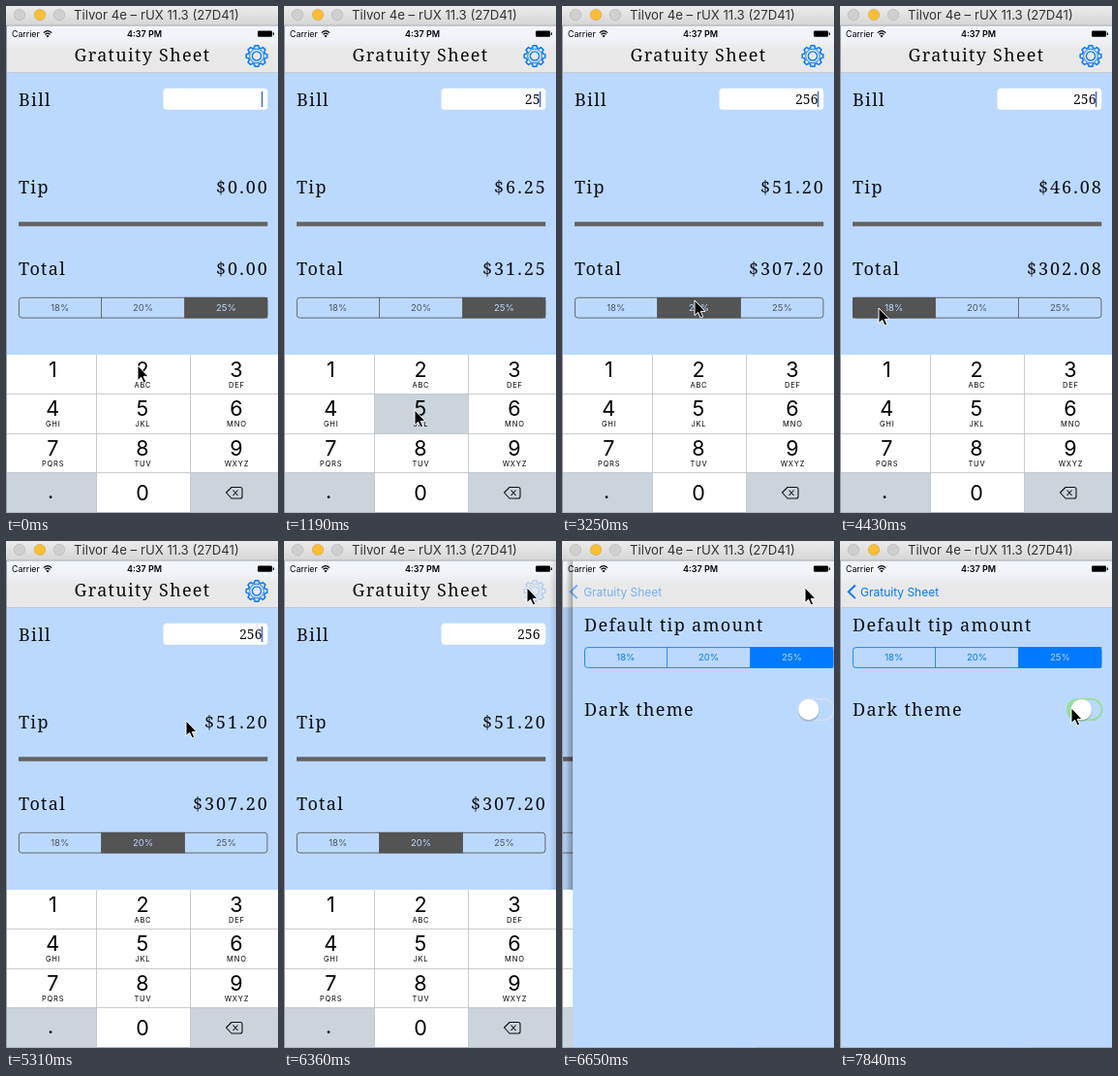
These frames come from a looping animation (281x522 px, 7990 ms). An HTML page:

```html
<!DOCTYPE html>
<html lang="en">
<head>
<meta charset="utf-8">
<title>Gratuity Sheet</title>
<style>
  html, body { margin: 0; width: 100%; height: 100%; overflow: hidden; background: #bbd9ff; }
  svg { display: block; width: 100vw; height: 100vh; }
  text { font-family: Inter, Roboto, sans-serif; white-space: pre; }
  .type { font-family: "Noto Serif", "Liberation Serif", serif; font-size: 18px; font-weight: 300; letter-spacing: 1.3px; fill: #0c0d10; }
  .sum { letter-spacing: 2px; text-anchor: end; }
  .mid { text-anchor: middle; }
  .seg { font-size: 9.5px; text-anchor: middle; }
  .digit { font-size: 21.5px; text-anchor: middle; }
  .letters { font-size: 7.5px; letter-spacing: .8px; text-anchor: middle; }
</style>
</head>
<body>
<svg id="stage" viewBox="0 0 281 522" preserveAspectRatio="none"></svg>
<script>
const LOOP = 7990, STEPS = 54, PUSH = 43;
const BLUE = '#007aff', SKY = '#bbd9ff', SLATE = '#545454', KEY_GRAY = '#cbd3db';
const APP = 'Gratuity Sheet';

// Pointer stops: step, x, y
const POINTER = [
  [0, 136, 370], [3, 136, 370], [6, 135, 416], [9, 135, 416], [11, 234, 416],
  [14, 234, 416], [18, 136, 303], [20, 137, 303], [23, 137, 303], [27, 40, 309],
  [30, 40, 311], [33, 129, 311], [35, 129, 311], [36, 186, 185], [37, 190, 178],
  [41, 251, 49], [43, 251, 48], [46, 251, 48], [50, 232, 149], [51, 229, 165],
  [52, 238, 172], [53, 239, 172]
];
const BILLS = [[0, ''], [2, '2'], [8, '25'], [12, '256']];
const PICKS = [[0, 2], [20, 1], [29, 0], [34, 1]];
const PRESSED = [[0, 0], [1, 2], [3, 0], [7, 5], [10, 0], [11, 6], [13, 0]];

const rect = (x, y, w, h, fill, more = '') =>
  `<rect x="${x}" y="${y}" width="${w}" height="${h}" fill="${fill}" ${more}/>`;
const text = (x, y, str, cls = '', more = '') =>
  `<text x="${x}" y="${y}" class="${cls}" ${more}>${str}</text>`;
const line = (x1, y1, x2, y2, color, width = 1) =>
  `<path d="M${x1} ${y1}L${x2} ${y2}" stroke="${color}" stroke-width="${width}" fill="none"/>`;

function segments(id, y, color, ink) {
  const edges = [13, 98.5, 184.5, 270.25];
  let out = '';
  for (let i = 0; i < 3; i++) {
    const x = edges[i], w = edges[i + 1] - x;
    out += rect(x, y, w, 21.5, color, `id="${id}${i}"`);
    out += text(x + w / 2, y + 14.2, ['18%', '20%', '25%'][i], 'seg', `id="${id}t${i}" data-ink="${ink}"`);
  }
  for (const x of edges.slice(1, 3)) out += line(x, y, x, y + 21.5, color, .8);
  return out + rect(13.4, y + .4, 256.5, 20.8, 'none', `rx="3" stroke="${color}" stroke-width=".85"`);
}

function keypad() {
  const xs = [1, 93.5, 190.5, 281], ys = [359.25, 399.5, 440.5, 480.5, 521.25];
  const letters = ['', 'ABC', 'DEF', 'GHI', 'JKL', 'MNO', 'PQRS', 'TUV', 'WXYZ'];
  const centers = [48.3, 141, 238];
  let out = rect(1, 359.25, 280, 162, '#fff');
  for (let i = 0; i < 9; i++) {
    const c = i % 3, r = i / 3 | 0;
    out += rect(xs[c], ys[r], xs[c + 1] - xs[c], ys[r + 1] - ys[r], '#fff', `id="key${i + 1}"`);
    out += text(centers[c], 381.7 + 40.5 * r, i + 1, 'digit');
    out += text(centers[c] + .4, 392.5 + 40.7 * r, letters[i], 'letters');
  }
  out += rect(1, 480.5, 92.5, 41, KEY_GRAY) + rect(190.5, 480.5, 91, 41, KEY_GRAY);
  for (const y of ys.slice(1, 4)) out += line(1, y, 281, y, '#bcc1c6', .8);
  for (const x of xs.slice(1, 3)) out += line(x, 359.25, x, 522, '#bcc1c6', .8);
  out += text(46, 507, '.', 'digit') + text(141, 508.7, '0', 'digit');
  return out + `<path d="M227.5 501L233 495.5H242Q244 495.5 244 497.5V505Q244 507 242 507H233ZM234.5 498.5L239.5 504M239.5 498.5L234.5 504"
    fill="none" stroke="#111" stroke-width="1.1" stroke-linejoin="round"/>`;
}

function gear() {
  const pts = [];
  for (let i = 0; i < 8; i++) {
    for (const [off, r] of [[-.27, 8.8], [-.17, 11], [.17, 11], [.27, 8.8]]) {
      const a = i * Math.PI / 4 + off;
      pts.push((r * Math.cos(a)).toFixed(2) + ' ' + (r * Math.sin(a)).toFixed(2));
    }
  }
  return `<g id="gear" transform="translate(259 51.5)" fill="none" stroke="${BLUE}" stroke-width="1.5" stroke-linejoin="round">
    <path d="M${pts.join('L')}Z"/><circle r="7.3" stroke-width="1"/><circle r="4.6" stroke-width="1.3"/></g>`;
}

const windowBar = () => rect(0, 0, 281, 20.5, 'url(#bar)') + line(0, 20, 281, 20, '#b5b5b5') +
  [['#cfcfcf', 14], ['#fdbe2f', 35], ['#cfcfcf', 55]].map(([c, x]) =>
    `<circle cx="${x}" cy="9" r="5.8" fill="${c}" stroke="#000" stroke-opacity=".13" stroke-width=".8"/>`).join('') +
  text(70, 14, 'Tilvor 4e – rUX 11.3 (27D41)', '', 'font-size="13.2" fill="#333"');

const statusBar = () => text(6, 32, 'Carrier', '', 'font-size="8.8"') +
  text(143, 32, '4:37 PM', 'mid', 'font-size="9" font-weight="600"') +
  `<path d="M38.8 27.6Q43 23.8 47.2 27.6M40.4 29.4Q43 27 45.6 29.4" fill="none" stroke="#000" stroke-width="1.2"/>
   <path d="M41.4 30.7Q43 29.4 44.6 30.7L43 32.4Z"/>` +
  rect(260, 25.5, 15, 6.2, '#000', 'rx="1.2"') + rect(275.7, 27.2, 1.2, 2.7, '#000', 'rx=".5"');

const mainView = () => rect(1, 20, 280, 502, SKY) +
  text(13, 102.5, 'Bill', 'type') + rect(162.5, 84.75, 107.75, 22, '#fff', 'rx="3.5"') +
  text(264.5, 101, '', 'type', 'id="bill" style="font-size:14px;letter-spacing:0;text-anchor:end"') +
  rect(263.8, 88, 1.5, 16, '#4467e6', 'id="caret"') +
  text(13, 192.5, 'Tip', 'type') + text(271.8, 192.5, '', 'type sum', 'id="tip"') +
  rect(13, 222.25, 257.25, 4.5, '#636363') +
  text(13, 277, 'Total', 'type') + text(271.8, 277, '', 'type sum', 'id="total"') +
  segments('rate', 299.9, SLATE, '#4c5665');

const settingsView = () => rect(1, 20, 281, 502, SKY) +
  text(13, 93, 'Default tip amount', 'type') + segments('preset', 109.2, BLUE, BLUE) +
  text(13, 180, 'Dark theme', 'type') +
  rect(233.8, 162, 37.6, 23, '', 'id="track" rx="11.5"') + rect(0, 0, 0, 0, SKY, 'id="hole"') +
  `<circle cy="175" r="11" fill="#000" opacity=".16" id="knobShade"/><circle cy="173.6" r="10.6" fill="#fff" id="knob"/>`;

const navBar = () => rect(1, 20.5, 280, 48, 'url(#nav)') + line(1, 68.5, 281, 68.5, '#c3cbd5') + statusBar() +
  text(141, 57, APP, 'type mid', 'id="title"') + gear() +
  `<g id="back"><path d="M15.8 45.5L8.8 52.3L15.8 59.1" fill="none" stroke="${BLUE}" stroke-width="2"/>` +
  text(21, 57, APP, '', `id="backLabel" font-size="12" fill="${BLUE}"`) + '</g>';

const gradient = (id, dir, stops) => `<linearGradient id="${id}" x1="0" y1="0" ${dir}>` +
  stops.map(([o, c, a = 1]) => `<stop offset="${o}" stop-color="${c}" stop-opacity="${a}"/>`).join('') + '</linearGradient>';

// The keypad slides out on its own, above the shadow
document.getElementById('stage').innerHTML = '<defs>' +
  gradient('bar', 'x2="0" y2="1"', [[0, '#ebebeb'], [1, '#d5d5d5']]) +
  gradient('nav', 'x2="0" y2="1"', [[0, '#f3f7fd'], [.3, '#eff2f7'], [.5, '#e9e9e9'], [1, '#e7e7e8']]) +
  gradient('edge', 'x2="1" y2="0"', [[0, '#000', 0], [1, '#000', .3]]) +
  '<clipPath id="screen"><rect x="1" y="20" width="280" height="501.25"/></clipPath></defs>' +
  rect(0, 520, 281, 2, '#9aa0a6') +
  `<g clip-path="url(#screen)"><g id="main">${mainView()}</g>` +
  rect(1, 20, 280, 502, '#000', 'id="dim"') + `<g id="settings">${settingsView()}</g>${navBar()}` +
  rect(-6, 20, 7, 502, 'url(#edge)', 'id="shadow"') + `<g id="keypad">${keypad()}</g></g>` +
  windowBar() + line(.5, 20, .5, 522, '#9aa0a6') +
  '<path id="pointer" d="M0 0V15.6L3.6 12.3L6.2 18L8.7 16.9L6.2 11.4H11Z" stroke="#fff" stroke-width="1" stroke-linejoin="round"/>';

const el = {};
document.querySelectorAll('[id]').forEach(e => el[e.id] = e);
const set = (id, attrs) => { for (const k in attrs) el[id].setAttribute(k, attrs[k]); };
const shift = (id, x) => set(id, { transform: `translate(${x.toFixed(2)} 0)` });
const clamp = v => Math.max(0, Math.min(1, v));
const at = (list, s) => list.filter(e => e[0] <= s).pop()[1];
const money = v => '$' + v.toFixed(2);

function select(id, pick) {
  for (let i = 0; i < 3; i++) {
    const label = id + 't' + i;
    set(id + i, { 'fill-opacity': i === pick ? 1 : 0 });
    set(label, { fill: i === pick ? SKY : el[label].dataset.ink });
  }
}

function pointerAt(s) {
  const i = POINTER.findIndex(p => p[0] >= s);
  const b = POINTER[i], a = POINTER[Math.max(0, i - 1)];
  const k = b[0] === a[0] ? 0 : (s - a[0]) / (b[0] - a[0]);
  const e = k * k * (3 - 2 * k);
  return [a[1] + (b[1] - a[1]) * e, a[2] + (b[2] - a[2]) * e];
}

function drawSwitch(on) {
  const knobX = on ? 249.4 : 244.8;
  set('track', { fill: on ? '#98dd9b' : '#d9e0e8' });
  // The rim thickens behind the knob as the switch turns on
  const x = on ? 239 : 235, pad = on ? 1.8 : 1.2;
  set('hole', { x, y: 162 + pad, width: 271.4 - pad - x, height: 23 - 2 * pad, rx: 11.5 - pad });
  set('knob', { cx: knobX });
  set('knobShade', { cx: knobX });
}

function draw(ms) {
  // The screen is refreshed in even steps
  const s = Math.min(STEPS - 1, Math.floor(ms / LOOP * STEPS + .12));

  const bill = at(BILLS, s), pick = at(PICKS, s), pressed = at(PRESSED, s);
  const tip = bill * [.18, .2, .25][pick];
  el.bill.textContent = bill;
  el.tip.textContent = money(tip);
  el.total.textContent = money(+bill + tip);
  select('rate', pick);
  select('preset', 2);
  for (let i = 1; i <= 9; i++) set('key' + i, { fill: i === pressed ? KEY_GRAY : '#fff' });
  set('caret', { opacity: s < PUSH && (s + 1) % 7 < 5 ? 1 : 0 });

  // Spring push to the settings screen
  const u = Math.max(0, s - PUSH) * 2.57;
  const left = s < PUSH ? 1 : (1 + u) * Math.exp(-u);
  const fade = clamp((s - PUSH) / 4);
  shift('main', -84 * (1 - left));
  shift('title', -84 * (1 - left));
  shift('keypad', -280 * (1 - left));
  shift('settings', 280 * left);
  shift('shadow', 280 * left);
  set('dim', { opacity: .08 * (1 - left) });
  set('settings', { opacity: s < PUSH ? 0 : 1 });
  set('shadow', { opacity: s < PUSH || s > 46 ? 0 : .4 + .6 * (1 - left) });
  set('title', { opacity: clamp(1 - (s - PUSH) / 1.5) });
  set('gear', { opacity: s < PUSH ? 1 : clamp(.22 - (s - PUSH) * .12) });
  set('back', { opacity: fade });
  set('backLabel', { x: 21 + 32 * left });

  drawSwitch(s >= 53);

  const [x, y] = pointerAt(s);
  set('pointer', { transform: `translate(${x.toFixed(2)} ${y.toFixed(2)})` });
}

const start = performance.now();
function tick() {
  draw((performance.now() - start) % LOOP);
  requestAnimationFrame(tick);
}
tick();
</script>
</body>
</html>
```
